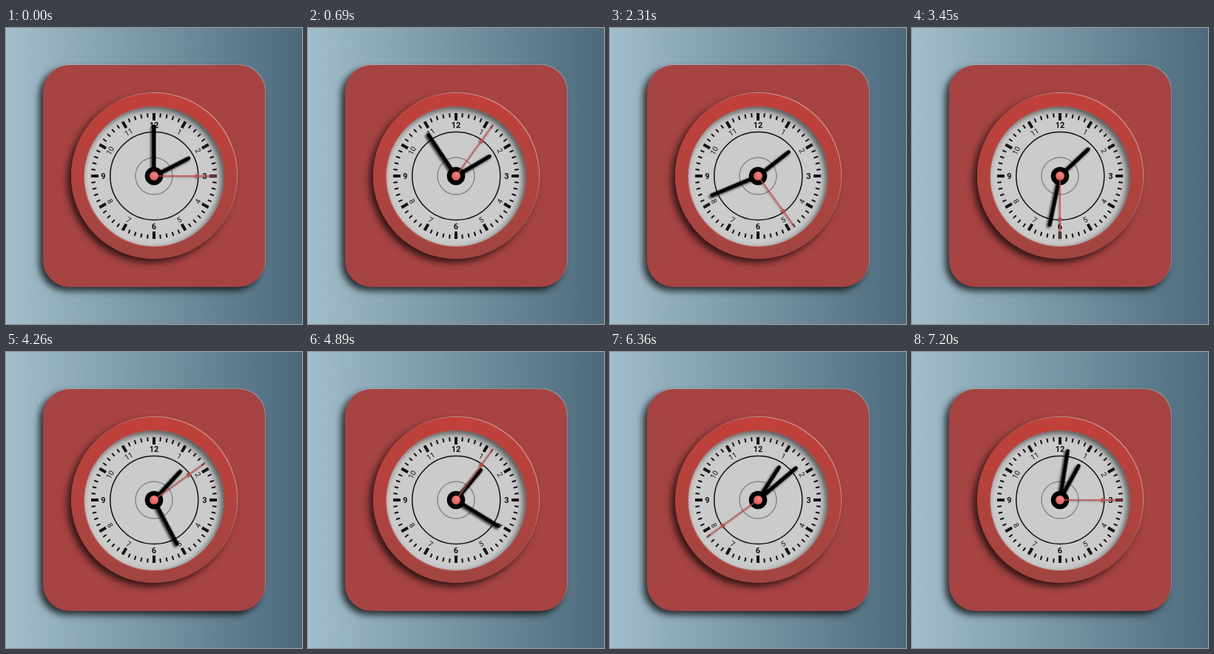
Animation, 400 px wide and 400 px high, one loop 7230 ms. Source, as an HTML page:

```html
<!DOCTYPE html>
<html lang="en">
<head>
<meta charset="utf-8">
<title>Clock</title>
<style>
  html, body { margin: 0; width: 100%; height: 100%; overflow: hidden; }
  .stage {
    position: relative; width: 400px; height: 400px; overflow: hidden;
    background: linear-gradient(90deg, #a2becc, #4c6a7c);
  }
  .stage > * { position: absolute; box-sizing: border-box; }
  .card {
    left: 50px; top: 50px; width: 300px; height: 300px; border-radius: 36px;
    background: #a64343;
    box-shadow: 1px -1px 1px rgba(255, 205, 200, .35), -5px 5px 10px rgba(0, 0, 0, .75);
  }
  .ring {
    left: 88px; top: 88px; width: 224px; height: 224px; border-radius: 50%;
    background: linear-gradient(#c2403a, #a04541);
    box-shadow: 1px -1px 1px rgba(255, 215, 205, .6), -5px 5px 10px rgba(0, 0, 0, .7);
  }
  .face {
    left: 106px; top: 106px; width: 189px; height: 189px; border-radius: 50%;
    background: #cbcbcb;
    box-shadow: inset -4px 4px 9px rgba(0, 0, 0, .6), -1px 1px 1px rgba(255, 190, 180, .25);
  }
  svg { left: 0; top: 0; }
  text { font-family: Roboto, Arial, sans-serif; font-size: 10px; text-anchor: middle; fill: #111; }
  .main { font-size: 11px; font-weight: 700; }
  .shade { filter: drop-shadow(-2px 2px 1.5px rgba(0, 0, 0, .75)); }
  .soft { filter: drop-shadow(-1px 1px 1px rgba(0, 0, 0, .45)); }
  .hand {
    transform-origin: 200px 200px;
    animation: turn 7230ms steps(241, end) infinite;
  }
  .hour { --from: 62.9deg; --to: 28.6deg; }
  .minute { --from: 0deg; --to: -352.5deg; }
  .second { --from: 90deg; --to: -4248deg; }
  @keyframes turn {
    from { transform: rotate(var(--from)); }
    to { transform: rotate(var(--to)); }
  }
</style>
</head>
<body>
<div class="stage">
  <div class="card"></div>
  <div class="ring"></div>
  <div class="face"></div>
  <svg width="400" height="400" viewBox="0 0 400 400">
    <defs>
      <radialGradient id="cap" cx=".6" cy=".35" r=".7">
        <stop offset="0" stop-color="#f08a84"/>
        <stop offset="1" stop-color="#d85552"/>
      </radialGradient>
    </defs>
    <g fill="none">
      <circle cx="200.3" cy="200" r="59.5" stroke="#111" stroke-width="1.5"/>
      <circle cx="200" cy="200" r="25" stroke="#858585" stroke-width="1.4"/>
    </g>
    <g id="dial"></g>
    <g class="shade">
      <rect class="hand hour" x="197.5" y="145" width="5" height="55" rx="2"/>
      <rect class="hand minute" x="197.5" y="130.5" width="5" height="69.5" rx="2"/>
    </g>
    <circle cx="200" cy="200" r="12.3"/>
    <g class="soft">
      <g class="hand second">
        <path d="M200 200V115" stroke="#c94b49" stroke-width="1.4"/>
        <circle cx="200" cy="141.5" r="2.6" fill="#c94b49"/>
      </g>
      <circle cx="200" cy="200" r="6" fill="url(#cap)"/>
    </g>
  </svg>
</div>
<script>
  const dial = document.getElementById('dial');

  function add(tag, attrs, label = '') {
    const el = document.createElementNS('http://www.w3.org/2000/svg', tag);
    for (const key in attrs) el.setAttribute(key, attrs[key]);
    el.textContent = label;
    dial.append(el);
  }

  for (let i = 0; i < 60; i++) {
    const [length, width] = i % 5 === 0 ? [10, 4] : [5.5, 2];
    add('path', {
      d: `M200 115v${length}`, stroke: '#111', 'stroke-width': width,
      transform: `rotate(${i * 6} 200 200)`
    });
  }

  // Numerals below the middle are flipped so that they read upright.
  for (let n = 1; n <= 12; n++) {
    const angle = n * 30;
    const a = angle * Math.PI / 180;
    const main = n % 3 === 0;
    const x = 200 + 68.5 * Math.sin(a);
    const y = 200 - 68.5 * Math.cos(a);
    const tilt = main ? 0 : n > 3 && n < 9 ? angle - 180 : angle;
    add('text', {
      y: main ? 3.9 : 3.5, class: main ? 'main' : '',
      transform: `translate(${x} ${y}) rotate(${tilt})`
    }, n);
  }
</script>
</body>
</html>
```
